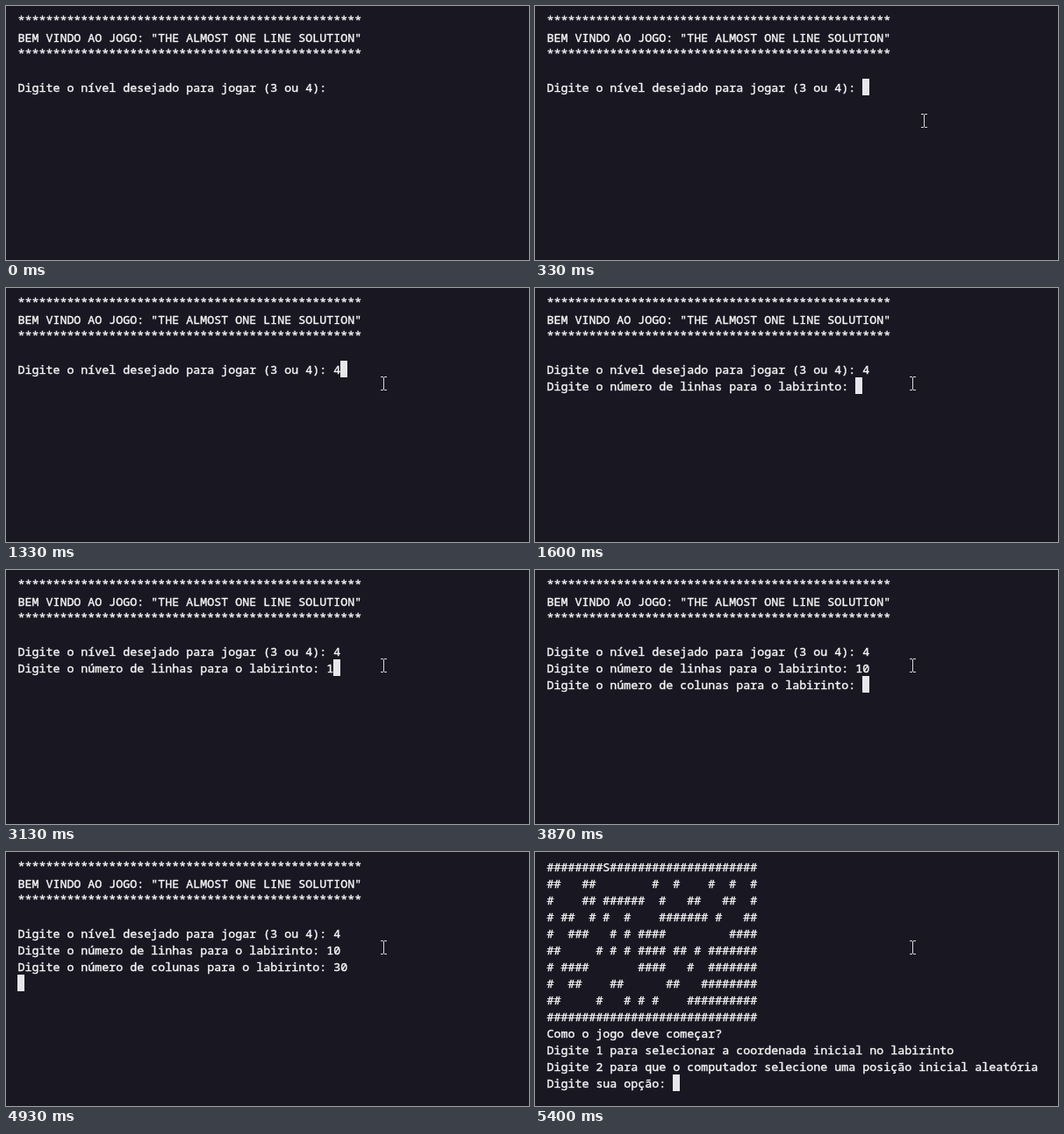
An HTML page with a canvas that plays this animation: 596 by 290 pixels, repeating every 8000 ms.

```html
<!DOCTYPE html>
<html lang="pt">
<head>
<meta charset="utf-8">
<title>Labirinto no terminal</title>
<style>
  html, body { margin: 0; width: 100%; height: 100%; overflow: hidden; background: #191722; }
  canvas { display: block; }
</style>
</head>
<body>
<canvas id="stage" width="596" height="290"></canvas>
<script>
const ctx = document.getElementById('stage').getContext('2d');
const LOOP = 8000;
const LEFT = 13, TOP = 7, CELL = 8, LINE = 19, BASELINE = 15;
const PAPER = '#191722', INK = '#f6f6f6', CURSOR = '#e7e6ea', POINTER = '#d8d8dc';

const stars = '*'.repeat(49);
const banner = [stars, 'BEM VINDO AO JOGO: "THE ALMOST ONE LINE SOLUTION"', stars, ''];
const level = 'Digite o nível desejado para jogar (3 ou 4): ';
const rows = 'Digite o número de linhas para o labirinto: ';
const columns = 'Digite o número de colunas para o labirinto: ';

const maze = [
  '########S#####################',
  '##   ##        #  #    #  #  #',
  '#    ## ######  #   ##   ##  #',
  '# ##  # #  #    ####### #   ##',
  '#  ###   # # ####         ####',
  '##     # # # #### ## # #######',
  '# ####       ####   #  #######',
  '#  ##    ##      ##   ########',
  '##     #   # # #    ##########',
  '#'.repeat(30),
  'Como o jogo deve começar?',
  'Digite 1 para selecionar a coordenada inicial no labirinto',
  'Digite 2 para que o computador selecione uma posição inicial aleatória',
  'Digite sua opção: '
];

// The block cursor sits after the last line of each screen.
const ask = (...lines) => [...banner, ...lines];
const screens = [
  [0, ask(level)],
  [1330, ask(level + '4')],
  [1600, ask(level + '4', rows)],
  [3130, ask(level + '4', rows + '1')],
  [3330, ask(level + '4', rows + '10')],
  [3870, ask(level + '4', rows + '10', columns)],
  [4330, ask(level + '4', rows + '10', columns + '3')],
  [4600, ask(level + '4', rows + '10', columns + '30')],
  [4930, ask(level + '4', rows + '10', columns + '30', '')],
  [5400, maze]
];
const CURSOR_ON = 270;

// Pointer steps: time, x, y
const pointer = [
  [70, 586, 283], [130, 549, 238], [200, 510, 196], [270, 472, 159],
  [330, 443, 131], [400, 424, 113], [530, 416, 106],
  [730, 424, 107], [800, 430, 109]
];

const latest = (steps, t) => steps.filter(([start]) => start <= t).pop();

function box(color, x, y, w, h) {
  ctx.fillStyle = color;
  ctx.fillRect(x, y, w, h);
}

function drawText(lines) {
  ctx.font = '13.3333px "Noto Sans Mono", monospace';
  ctx.fillStyle = ctx.strokeStyle = INK;
  ctx.lineWidth = 0.4;
  ctx.lineJoin = 'round';
  lines.forEach((line, row) => {
    const lift = line.startsWith('*') ? 1 : 0;
    const x = LEFT + 0.4, y = TOP + row * LINE + BASELINE - lift;
    ctx.fillText(line, x, y);
    ctx.strokeText(line, x, y);
  });
}

function drawCursor(lines) {
  const row = lines.length - 1;
  box(CURSOR, LEFT + lines[row].length * CELL, TOP + row * LINE, CELL, LINE);
}

function drawPointer(x, y) {
  for (const edge of [y - 8, y + 7]) {
    box(POINTER, x - 3, edge, 3, 1);
    box(POINTER, x + 1, edge, 3, 1);
  }
  box(POINTER, x, y - 7, 1, 14);
}

function draw(t) {
  box(PAPER, 0, 0, 596, 290);
  const [, lines] = latest(screens, t);
  if (t >= CURSOR_ON) drawCursor(lines);
  drawText(lines);
  const spot = latest(pointer, t);
  if (spot) drawPointer(spot[1], spot[2]);
}

const begin = performance.now();
function tick() {
  draw((performance.now() - begin) % LOOP);
  requestAnimationFrame(tick);
}
tick();
</script>
</body>
</html>
```
